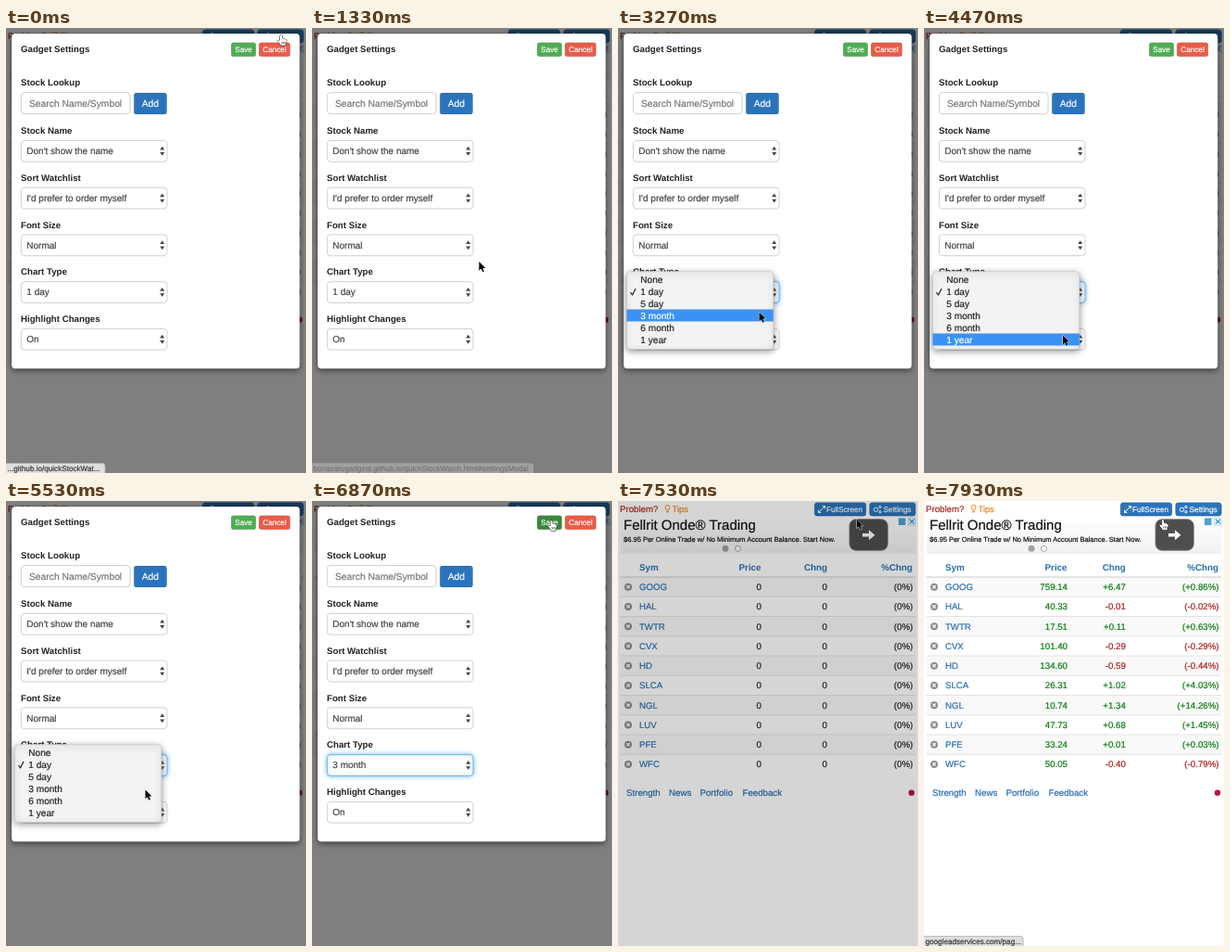
An HTML page with a canvas for the animation above (8 s loop, 324 by 480 pixels).

```html
<!DOCTYPE html>
<html lang="en">
<head>
<meta charset="utf-8">
<title>Gadget settings</title>
<style>
html, body { margin: 0; width: 100%; height: 100%; overflow: hidden; background: #fff; }
canvas { display: block; width: 324px; height: 480px; }
</style>
</head>
<body>
<canvas id="stage"></canvas>
<script>
const W = 324, H = 480, LOOP = 8000;
const BLUE = '#2b74bb', LINK = '#2a6db0', GREEN = '#0b7a12', RED = '#a8201c', INK = '#333';

// Moments of the interaction, in ms
const OPEN = 2670, PICK = 5460, CLOSE = 5640, PRESS = 6790, HIDE = 7130, UNDIM = 7430, LOAD = 7660, HOVER = 7790;

const canvas = document.getElementById('stage');
const dpr = window.devicePixelRatio || 1;
canvas.width = W * dpr;
canvas.height = H * dpr;
const c = canvas.getContext('2d');
c.textRendering = 'geometricPrecision';

const ramp = (t, from, to) => Math.min(1, Math.max(0, (t - from) / (to - from)));
const easeOut = p => 1 - (1 - p) ** 2;
const smooth = p => p * p * (3 - 2 * p);

function text(s, x, y, size = 9.7, color = INK, align = 'left', weight = 'normal') {
  c.font = `${weight} ${size}px "Liberation Sans", Arial, sans-serif`;
  c.textAlign = align;
  c.fillStyle = c.strokeStyle = color;
  c.fillText(s, x, y);
  if (weight === 'bold') return;
  // a hairline gives the regular weight its slightly heavy smoothing
  c.lineWidth = 0.2;
  c.lineJoin = 'round';
  c.strokeText(s, x, y);
}

function box(x, y, w, h, r, fill, stroke) {
  c.beginPath();
  c.roundRect(x, y, w, h, r);
  if (fill) { c.fillStyle = fill; c.fill(); }
  if (stroke) { c.strokeStyle = stroke; c.lineWidth = 0.8; c.stroke(); }
}

function shadowed(color, blur, dy, draw) {
  c.save();
  c.shadowColor = color;
  c.shadowBlur = blur * dpr;
  c.shadowOffsetY = dy * dpr;
  draw();
  c.restore();
}

function line(points, color, width = 1) {
  c.beginPath();
  points.forEach(([x, y]) => c.lineTo(x, y));
  c.strokeStyle = color;
  c.lineWidth = width;
  c.stroke();
}

function poly(points, color) {
  c.beginPath();
  points.forEach(([x, y]) => c.lineTo(x, y));
  c.closePath();
  c.fillStyle = color;
  c.fill();
}

function dot(x, y, r, fill, stroke) {
  c.beginPath();
  c.arc(x, y, r, 0, 7);
  if (fill) { c.fillStyle = fill; c.fill(); }
  if (stroke) { c.strokeStyle = stroke; c.lineWidth = 1; c.stroke(); }
}

function cross(x, y, r, color, width) {
  line([[x - r, y - r], [x + r, y + r]], color, width);
  line([[x - r, y + r], [x + r, y - r]], color, width);
}

// ---- Page under the dialog ----
const quotes = [
  ['GOOG', '759.14', '+6.47', '+0.86'], ['HAL', '40.33', '-0.01', '-0.02'],
  ['TWTR', '17.51', '+0.11', '+0.63'], ['CVX', '101.40', '-0.29', '-0.29'],
  ['HD', '134.60', '-0.59', '-0.44'], ['SLCA', '26.31', '+1.02', '+4.03'],
  ['NGL', '10.74', '+1.34', '+14.26'], ['LUV', '47.73', '+0.68', '+1.45'],
  ['PFE', '33.24', '+0.01', '+0.03'], ['WFC', '50.05', '-0.40', '-0.79']
];

function toolbar() {
  text('Problem?', 2, 12, 9.7, '#b0261f');
  dot(53.5, 7, 2.5, null, '#e8931c');
  line([[52, 11.5], [55, 11.5]], '#e8931c', 1.6);
  text('Tips', 58.5, 12, 9.4, '#e8861c');

  box(212.4, 1.9, 55.2, 14, 2.5, BLUE, '#2665a5');
  line([[217, 12], [223, 6]], '#fff');
  poly([[220.3, 5], [224, 5], [224, 8.7]], '#fff');
  poly([[216, 9.3], [216, 13], [219.7, 13]], '#fff');
  text('FullScreen', 225, 12, 8.2, '#fff');

  box(271.9, 1.9, 49.2, 14, 2.5, BLUE, '#2665a5');
  dot(278.5, 9.3, 2.2, null, '#fff');
  dot(283, 6.5, 1.2, null, '#fff');
  dot(283, 11.8, 1.2, null, '#fff');
  text('Settings', 286.5, 12, 8.4, '#fff');
}

function advert() {
  const shade = c.createLinearGradient(0, 17, 0, 57);
  shade.addColorStop(0, '#fff');
  shade.addColorStop(1, '#f1f1f1');
  c.fillStyle = shade;
  c.fillRect(3, 17, 318.5, 40);
  text('Fellrit Onde® Trading', 6, 31.3, 15, '#111');
  text('$6.95 Per Online Trade w/ No Minimum Account Balance. Start Now.', 6, 44, 7.53, '#111');
  dot(116, 51.3, 3.5, '#a0a0a0');
  dot(129.5, 51.3, 3.1, '#fff', '#a0a0a0');
  box(250, 19.7, 41.3, 33.6, 7, '#4e4e50', '#77777a');
  line([[264, 36.7], [273, 36.7]], '#fff', 3.6);
  poly([[271, 31.2], [277.5, 36.7], [271, 42.2]], '#fff');
  c.fillStyle = '#4ba3d3';
  c.fillRect(303, 18.5, 7.5, 7.5);
  box(313.4, 18, 8, 8.4, 0, '#eef6fb', '#b5d3e3');
  cross(317.4, 22.2, 2.5, '#2a8fc4', 1.2);
}

function watchlist(loaded) {
  const changeX = loaded ? 217.8 : 226; // wide percentages push this column left
  [['Sym', 23, 'left'], ['Price', 154.5, 'right'], ['Chng', changeX, 'right'], ['%Chng', 318, 'right']]
    .forEach(([s, x, align]) => text(s, x, 75, 9.8, LINK, align, 'bold'));
  quotes.forEach(([sym, price, change, percent], i) => {
    const y = 82 + 21.25 * i, base = y + 14.2;
    const color = !loaded ? '#222' : change[0] === '+' ? GREEN : RED;
    if (i % 2 === 0) {
      c.fillStyle = '#f9f9f9';
      c.fillRect(2.5, y, 318.5, 21.25);
    }
    line([[2.5, y], [321, y]], '#ddd', i ? 0.8 : 1.4);
    dot(11, y + 10.7, 4, '#8c8c8c');
    cross(11, y + 10.7, 1.7, '#fff', 1.1);
    text(sym, 23, base, 9.6, LINK);
    text(loaded ? price : '0', 155, base, 9.7, loaded ? GREEN : '#222', 'right');
    text(loaded ? change : '0', changeX, base, 9.7, color, 'right');
    text(`(${loaded ? percent : '0'}%)`, 318.5, base, 9.7, color, 'right');
  });
}

function page(t) {
  c.fillStyle = '#fff';
  c.fillRect(0, 0, W, H);
  toolbar();
  advert();
  watchlist(t >= LOAD);
  [['Strength', 9], ['News', 55], ['Portfolio', 88.5], ['Feedback', 134.5]]
    .forEach(([s, x]) => text(s, x, 318, 9.7, LINK));
  dot(317, 314.8, 3.2, '#bd1440');
}

// ---- Settings dialog ----
function button(label, x, y, w, h, size, fill) {
  box(x, y, w, h, 2.5, fill, 'rgba(0,0,0,.12)');
  text(label, x + w / 2, y + h / 2 + size * 0.36, size, '#fff', 'center');
}

function select(label, value, i, focused) {
  const y = 121.4 + 50.75 * i;
  text(label, 16, y - 7.3, 9.7, '#222', 'left', 'bold');
  const frame = () => box(16.4, y, 157.6, 22.8, 3.5, '#fff', focused ? '#55a8ea' : '#c4c4c4');
  focused ? shadowed('rgba(80,170,240,.8)', 5, 0, frame) : frame();
  text(value, 22.3, y + 14.6, 10, '#444');
  poly([[166.2, y + 10.2], [168.7, y + 6.4], [171.2, y + 10.2]], '#444');
  poly([[166.2, y + 12.6], [168.7, y + 16.4], [171.2, y + 12.6]], '#444');
}

function dialog(t) {
  if (t >= HIDE + 150) return;
  c.save();
  c.globalAlpha = 1 - ramp(t, HIDE, HIDE + 150);
  c.translate(0, -93 * easeOut(ramp(t, HIDE, HIDE + 300)));
  shadowed('rgba(0,0,0,.5)', 6.3, 2.1, () => box(6, 6, 311.3, 361.6, 4, '#fff'));
  box(6, 6, 311.3, 361.6, 4, null, 'rgba(0,0,0,.2)');
  text('Gadget Settings', 16, 26, 9.7, '#222', 'left', 'bold');
  button('Save', 243.2, 15.8, 26.6, 15, 8.2, t >= PRESS ? '#38883a' : '#4fad54');
  button('Cancel', 273.2, 15.8, 33.6, 15, 8.2, '#e95c48');
  text('Stock Lookup', 16, 62.4, 9.7, '#222', 'left', 'bold');
  box(16.4, 69.6, 117.6, 23, 3.5, '#fff', '#c4c4c4');
  text('Search Name/Symbol', 25, 84.6, 10.3, '#777');
  button('Add', 138.2, 70, 35.4, 23, 10.3, BLUE);
  const span = t < CLOSE ? '1 day' : '3 month';
  [['Stock Name', "Don't show the name"], ['Sort Watchlist', "I'd prefer to order myself"],
   ['Font Size', 'Normal'], ['Chart Type', span], ['Highlight Changes', 'On']]
    .forEach(([label, value], i) => select(label, value, i, i === 3 && t >= OPEN && t < HIDE));
  c.restore();
}

const options = ['None', '1 day', '5 day', '3 month', '6 month', '1 year'];

function menu(t, pointerY) {
  if (t < OPEN || t > CLOSE + 200) return;
  const blink = t >= PICK && t < PICK + 100;
  const active = blink ? -1 : Math.floor((pointerY - 265) / 13);
  c.save();
  c.globalAlpha = 1 - ramp(t, CLOSE, CLOSE + 200);
  shadowed('rgba(0,0,0,.4)', 7, 2, () => box(9.4, 262.8, 158.4, 83.6, 4, '#f3f3f3', '#ccc'));
  options.forEach((label, i) => {
    const y = 265 + 13 * i, on = i === active;
    if (on) {
      c.fillStyle = '#3b92f5';
      c.fillRect(9.4, y - 0.5, 158.4, 13);
    }
    text(label, 24.3, y + 10.2, 10.1, on ? '#fff' : '#222');
    if (i === 1) line([[13.5, y + 7.2], [15.5, y + 10], [19, y + 3]], on ? '#fff' : '#222', 1.2);
  });
  c.restore();
}

// ---- Browser status bubble ----
function bubble(s, width, alpha) {
  c.save();
  c.globalAlpha = alpha;
  box(-3, 469.6, width + 3, 14, 3, '#dedede', '#aaa');
  c.beginPath();
  c.rect(0, 469, width - 2, 11);
  c.clip();
  text(s, 1.5, 478, 8.15, '#333');
  c.restore();
}

function status(t) {
  if (t >= HOVER) return bubble('googleadservices.com/pag...', 107, 1);
  if (t >= 1400) return;
  const grow = smooth(ramp(t, 500, 800));
  const label = grow ? 'bonasarugadgets.github.io/quickStockWatch.html#settingsModal' : '...github.io/quickStockWat...';
  bubble(label, 107 + 132 * grow, 1 - ramp(t, 1200, 1400));
}

// ---- Pointer: [time, x, y] of the hot spot ----
const path = [
  [0, 297, 7.5], [930, 297, 7.5], [1130, 243, 120], [1330, 180.5, 251.5], [1530, 163, 329],
  [1800, 163, 328.5], [2270, 154.5, 277], [2530, 155, 276], [OPEN, 155, 276], [3000, 153, 297],
  [3270, 152.5, 306.5], [3530, 152.5, 309], [4200, 150, 331], [4500, 150, 331.5], [4730, 150, 324],
  [4930, 151, 312], [5070, 150.5, 311.5], [5900, 150.5, 311.5], [6300, 215, 150], [6700, 258.5, 21],
  [HIDE, 258.5, 20.5], [UNDIM, 257.8, 19.3], [LOAD, 257.5, 20], [LOOP, 258, 20]
];

function pointerAt(t) {
  const i = path.findIndex(k => k[0] > t);
  const [t0, x0, y0] = path[i - 1], [t1, x1, y1] = path[i];
  const p = ramp(t, t0, t1);
  return [x0 + (x1 - x0) * p, y0 + (y1 - y0) * p];
}

const arrow = new Path2D('M0 0V10.6L2.4 8.4L4.1 12.2L5.9 11.4L4.3 7.7H7.6Z');
const hand = new Path2D('M-1.2 1Q0 -.8 1.2 1V4.2Q2.2 3.4 3 4.6Q4.2 3.9 4.8 5.2Q6.6 4.8 6.4 6.8' +
  'Q6.4 9.4 5.2 10.4V12.2H-.7V11Q-2.6 9.2-3.8 6.8Q-3.6 5.2-1.2 6.8Z');

function pointer(t, [x, y]) {
  const isHand = t < 1000 || (t >= 6680 && t < HIDE) || t >= HOVER;
  c.save();
  c.translate(x, y);
  c.scale(0.92, 0.92);
  c.lineJoin = 'round';
  c.lineWidth = 1;
  c.fillStyle = isHand ? '#fff' : '#000';
  c.strokeStyle = isHand ? '#000' : '#fff';
  c.stroke(isHand ? hand : arrow);
  c.fill(isHand ? hand : arrow);
  if (isHand) [1, 2.9, 4.6].forEach(k => line([[k, 8], [k, 10.4]], '#000', 0.6));
  c.restore();
}

function draw(now) {
  const t = now % LOOP, spot = pointerAt(t);
  c.setTransform(dpr, 0, 0, dpr, 0, 0);
  page(t);
  c.fillStyle = `rgba(0,0,0,${0.5 * (1 - ramp(t, UNDIM, UNDIM + 150))})`;
  c.fillRect(0, 0, W, H);
  dialog(t);
  menu(t, spot[1]);
  status(t);
  pointer(t, spot);
}

const start = performance.now();
function tick() {
  draw(performance.now() - start);
  requestAnimationFrame(tick);
}
tick();
</script>
</body>
</html>
```
